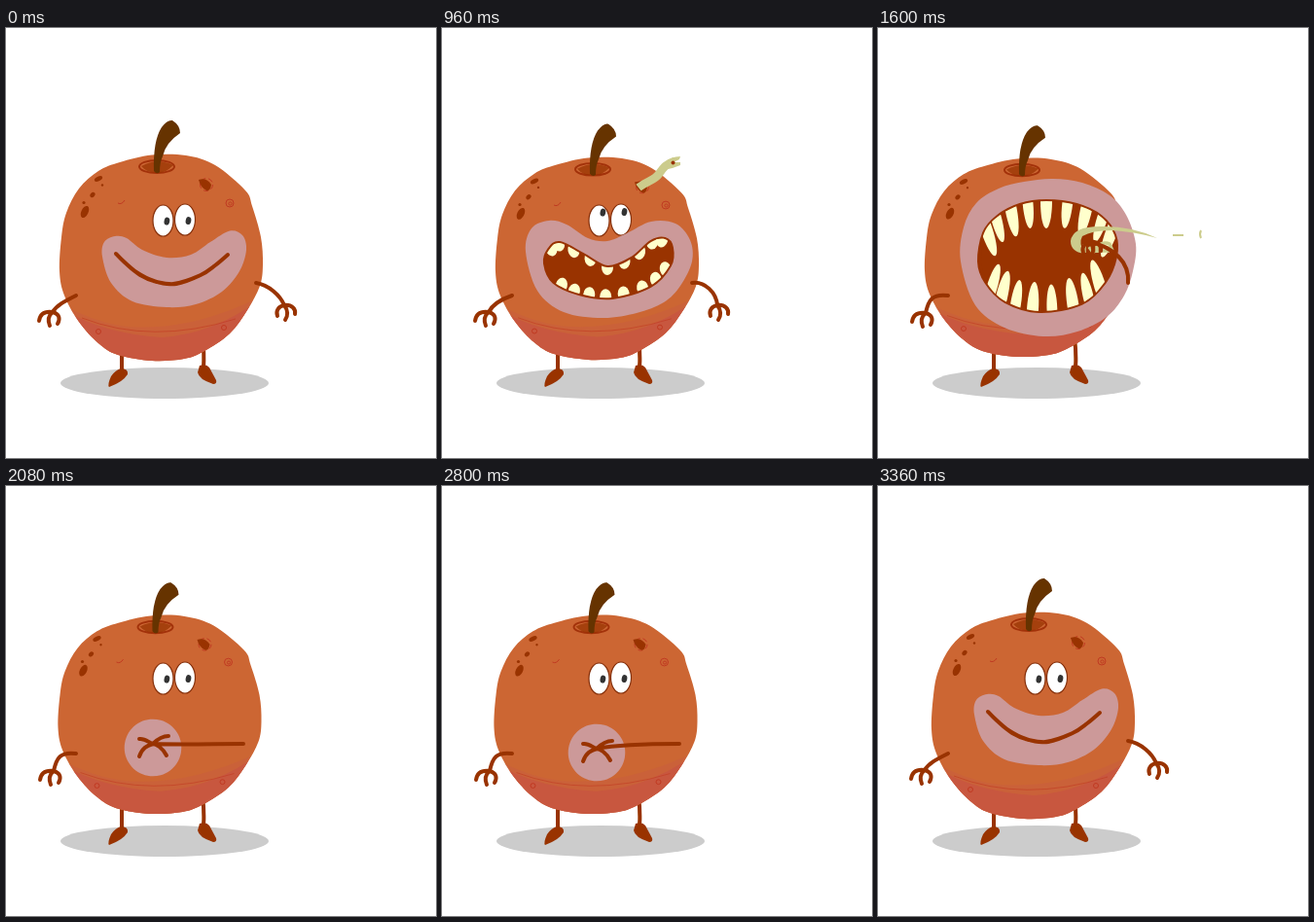
Animation, 442 px wide and 442 px high, one loop 3.4 s. Source, as an HTML page:

```html
<!DOCTYPE html>
<html lang="en">
<head>
<meta charset="utf-8">
<title>Hungry apple</title>
<style>
html, body { margin: 0; width: 100%; height: 100%; overflow: hidden; background: #fff; }
svg { display: block; width: 100vw; height: 100vh; }
.line { fill: none; stroke: #930; stroke-width: 4; stroke-linecap: round; stroke-linejoin: round; }
.thin { fill: none; stroke: #c03a22; stroke-width: 1; }
.dark { fill: #930; }
.worm { fill: none; stroke: #cccc8c; stroke-linecap: butt; }
.eye { fill: #fff; stroke: #84300c; stroke-width: 1.2; }
</style>
</head>
<body>
<svg viewBox="0 0 442 442">
  <defs>
    <clipPath id="skinClip"><path id="skinEdge"/></clipPath>
    <clipPath id="mouthClip"><path id="mouthEdge"/></clipPath>
    <clipPath id="eyeClip">
      <ellipse cx="161.5" cy="198" rx="11.5" ry="17"/>
      <ellipse cx="184" cy="197" rx="11.5" ry="17"/>
    </clipPath>
  </defs>

  <ellipse cx="163" cy="365" rx="107" ry="16" fill="#ccc"/>
  <path class="line" d="M119 322V352M202 318Q204 335 203 350"/>
  <path class="dark" d="M118 350Q126 350 125 356Q120 364 106 369Q104 367 108 358Q112 352 118 350Z"/>
  <path class="dark" d="M199 347Q206 345 209 349L216 362Q217 366 213 366Q198 361 197 354Z"/>

  <g id="body">
    <path id="skin" fill="#c63"/>
    <g clip-path="url(#skinClip)">
      <path fill="#c85c40" d="M50 280Q90 303 125 307Q190 312 262 276V350H50Z" opacity=".45"/>
      <path fill="#c8573f" d="M60 290Q100 314 160 318Q215 314 262 278V350H60Z"/>
      <path class="thin" d="M78 298Q150 326 236 299" opacity=".6"/>
    </g>
    <circle class="thin" cx="95" cy="312" r="2.5"/>
    <circle class="thin" cx="224" cy="308" r="2.5"/>
    <ellipse class="dark" cx="95" cy="155" rx="4.5" ry="2.3" transform="rotate(-28 95 155)"/>
    <circle class="dark" cx="99" cy="161.500" r="1.2"/>
    <ellipse class="dark" cx="89" cy="171.500" rx="2.2" ry="3" transform="rotate(40 89 171.5)"/>
    <circle class="dark" cx="80" cy="179.500" r="1.6"/>
    <ellipse class="dark" cx="81" cy="189" rx="3.6" ry="6.5" transform="rotate(25 81 189)"/>
    <path class="thin" d="M115 180Q119 182 122 177"/>
    <circle class="thin" cx="230" cy="180" r="4"/>
    <circle class="thin" cx="230.500" cy="180.500" r="1.6"/>
    <circle class="thin" cx="206" cy="161" r="6.5" stroke-dasharray="5 3"/>
    <path class="dark" d="M198 156Q206 153 211 161Q210 168 206 167Q200 164 198 156Z"/>
    <ellipse class="thin" cx="155" cy="142.500" rx="18" ry="6.500" style="stroke:#a3320a;stroke-width:2"/>
    <path class="dark" d="M139 142Q155 133 172 141Q163 150 155 149Q145 149 139 142Z" opacity=".75"/>
    <path fill="#630" d="M152 147Q151 116 160 102Q166 94 171 95Q179 100 179 108Q164 118 161 132Q158 138 158 148Q155 151 152 147Z"/>
  </g>

  <g id="worm">
    <path id="wormBody" class="worm" stroke-width="8.500" pathLength="1" stroke-dasharray="1 2" d="M202 164C211 157 218 157 223 150S231 139 239 137"/>
    <g id="wormHead">
      <path fill="#cccc8c" d="M230 138Q235 132 245 132L244 135L238 138L245 138V141Q238 144 232 145Z"/>
      <circle class="dark" cx="237.500" cy="138.500" r="2"/>
    </g>
  </g>

  <ellipse class="eye" cx="161.500" cy="198" rx="10.500" ry="16"/>
  <ellipse class="eye" cx="184" cy="197" rx="10.500" ry="16"/>
  <g clip-path="url(#eyeClip)">
    <g id="pupils" fill="#333">
      <ellipse cx="165.500" cy="198.500" rx="2.800" ry="4" transform="rotate(12 165 198)"/>
      <ellipse cx="187.500" cy="198" rx="2.800" ry="4" transform="rotate(12 187 198)"/>
    </g>
    <path id="lid" fill="#c63" stroke="#84300c" stroke-width="2" d="M130 140H215V197L173 201L130 205Z"/>
  </g>

  <g id="mouth">
    <path id="lips" fill="#c99"/>
    <path id="gap" fill="#930" stroke="#930" stroke-width="4" stroke-linejoin="round"/>
    <g id="teeth" fill="#ffc" clip-path="url(#mouthClip)"></g>
  </g>

  <g id="slurp">
    <path fill="#cccc8c" d="M287 216Q262 204 232 204Q200 203 198 219Q198 230 212 232Q206 221 210 214Q220 208 240 208Q262 209 287 216Z"/>
    <path class="worm" stroke-width="3.500" d="M212 222V231M217 225L222 232M225 231V225Q232 219 238 222L241 229M228 229H238"/>
    <path id="streak" class="worm" stroke-width="2" d="M303 213H314M332 208Q330 212 332 216"/>
  </g>
  <path id="leftArm" class="line"/>
  <path id="rightArm" class="line"/>
</svg>

<script>
const LOOP = 3400;
const el = id => document.getElementById(id);
const set = (id, name, value) => el(id).setAttribute(name, value);
const mix = (a, b, p) => Array.isArray(a) ? a.map((v, i) => mix(v, b[i], p)) : a + (b - a) * p;

// Value of a track of [time, value] rows, eased between rows.
function at(track, t) {
  const i = track.findIndex(row => row[0] > t);
  if (i < 0) return track[track.length - 1][1];
  const [t0, a] = track[i - 1], [t1, b] = track[i];
  const p = (t - t0) / (t1 - t0);
  return mix(a, b, p * p * (3 - 2 * p));
}

// Closed smooth curve through a flat list of x, y values.
function smooth(flat) {
  const n = flat.length / 2;
  const pt = i => { const k = (i + n) % n; return [flat[2 * k], flat[2 * k + 1]]; };
  let d = "M" + pt(0);
  for (let i = 0; i < n; i++) {
    const [a, b, c, e] = [pt(i - 1), pt(i), pt(i + 1), pt(i + 2)];
    const c1 = b.map((v, k) => v + (c[k] - a[k]) / 6);
    const c2 = c.map((v, k) => v - (e[k] - b[k]) / 6);
    d += `C${c1} ${c2} ${c}`;
  }
  return d + "Z";
}

const skin = smooth([95,147, 117,138, 150,130.5, 185,131, 215,141, 246,167, 253,183, 262,215,
  264,243, 261,265, 248,290, 230,314, 204,332, 183,340, 150,342, 115,336, 95,324, 75,302,
  60,275, 55,250, 57,215, 62,190, 75,165]);
set("skin", "d", skin);
set("skinEdge", "d", skin);

// Mouth poses: lips, gap, tooth size [rx, ry, scale of every second tooth].
const smile = [
  [99,235, 101,220, 112,214, 124,216, 140,228, 165,236, 190,233, 210,220, 230,208.5, 243,213,
    247,228, 240,250, 222,271, 195,284, 165,287, 130,281, 108,262],
  [113,232, 122,241, 138,254, 155,261, 175,263, 200,254, 215,244, 228,233, 215,244, 200,254,
    172,263, 152,260, 134,251, 120,239],
  [0, 0, 0]];
const talk = [
  [97,250, 103,229, 118,216, 135,215, 155,226, 170,229, 190,219, 215,209, 235,210, 247,225,
    249,243, 243,265, 225,283, 195,294, 165,298, 130,294, 108,280],
  [128,255, 131,245, 141,241, 155,247, 175,249, 195,240, 208,232, 216,239, 217,255, 215,264,
    195,273, 165,275, 141,271, 131,265],
  [7, 7, 0]];
const grin = [
  [86,230, 92,206, 110,198, 128,202, 150,216, 170,219, 190,211, 215,199, 240,201, 255,218,
    257,240, 245,265, 228,282, 200,293, 165,298, 125,292, 98,270],
  [106,242, 110,228, 121,221, 145,233, 170,246, 195,237, 215,220, 229,217, 236,226, 234,244,
    214,265, 175,277, 141,273, 115,261],
  [6, 8, 1]];
const wide = [
  [85,240, 88,205, 101,180, 124,165, 150,158, 180,155, 210,159, 238,172, 255,192, 265,222,
    262,250, 253,275, 235,297, 205,312, 170,317, 130,308, 100,285],
  [104,240, 109,211, 123,194, 146,182, 173,178, 204,182, 229,194, 243,213, 244,235, 233,261,
    209,283, 166,291, 131,281, 111,261],
  [6, 28, 0.9]];
const ring = (n, x, y, r) => Array.from({ length: n * 2 }, (_, i) => {
  const a = Math.PI + Math.floor(i / 2) * 2 * Math.PI / n;
  return i % 2 ? y + r * Math.sin(a) : x + r * Math.cos(a);
});
const pucker = [ring(17, 151, 269, 29.3), ring(14, 151, 265, 0.2), [0, 0, 0]];

const mouthTrack = [[0, smile], [160, talk], [280, mix(smile, talk, 0.6)], [400, talk], [520, talk],
  [680, grin], [1040, grin], [1360, wide], [1680, wide], [2000, pucker], [3160, pucker], [3360, smile]];

// Body pose: shift x, shift y, scale y.
const tall = [0, 0, 1], rest = [0, 5.45, 0.981], lean = [-7, 8.9, 0.962], tucked = [-1.5, 7.9, 0.962];
const bodyTrack = [[0, tall], [200, rest], [560, rest], [620, tall], [680, rest], [960, rest],
  [1080, tall], [1360, lean], [1720, lean], [2040, tucked], [2800, tucked], [3040, tall]];

// Arms: shoulder, two controls, hand.
const loose = [72,275, 60,281, 52,285, 48,292];
const hung = [72,275, 57,273, 52,282, 48,292];
const bent = [72,275, 56,273, 52,279, 49,293];
const leftTrack = [[0, loose], [200, hung], [560, hung], [620, loose], [680, hung], [1080, loose],
  [1360, bent], [2800, bent], [3040, loose]];

const down = [257,262, 270,264, 282,275, 286,285];
const relaxed = [257,262, 270,260, 282,272, 283,285];
const grab = [257,262, 300,250, 290,170, 246,142];
const rub = [244,265, 215,265, 180,266, 151,265];
const rightTrack = [[0, down], [200, relaxed], [960, relaxed], [1080, grab], [1120, grab],
  [1280, [257,262, 290,250, 320,180, 345,150]], [1440, [257,262, 300,270, 350,240, 382,218]],
  [1600, [257,262, 259,241, 242,225, 218,220]], [1720, [257,262, 259,241, 242,225, 218,220]],
  [1960, rub], [3160, rub], [3360, down]];

const leftFingers = [[-8,-1, -13,2, -14,9], [-5,4, -5,9, -3,14], [7,2, 8,7, 5,12]];
const open = [[-6,1, -9,6, -7,11], [4,5, 4,11, 1,15], [8,-1, 12,4, 11,9], [0,0, 0,0, 0,0]];
const spread = [[-4,-1, -8,-6, -14,-5], [-6,2, -11,4, -14,13], [3,0, 10,4, 14,12], [4,-4, 10,-8, 16,-8]];
const fingerTrack = [[0, open], [1680, open], [1960, spread], [3160, spread], [3360, open]];

const lidTrack = [[0, 0], [160, 1], [540, 1], [640, 0]];
const gazeTrack = [[0, 0], [160, 4], [520, 4], [640, -9], [1440, -9], [1680, 0]];
const wormTrack = [[0, 0], [240, 1]];
const spinTrack = [[0, 0], [1120, 0], [1440, 150]];
const swayTrack = [[0, 12], [2600, 12], [2800, 5]];
const rubTrack = [[0, 0], [2040, 0], [2080, 1], [3160, 1], [3280, 0]];

const teeth = [];
function addTeeth(count, start, step, side) {
  for (let i = 0; i < count; i++) {
    const node = document.createElementNS("http://www.w3.org/2000/svg", "ellipse");
    el("teeth").append(node);
    teeth.push({ node, u: start + step * i, side, odd: i % 2 });
  }
}
addTeeth(9, 1.2, 0.7, 1);
addTeeth(8, 9.2, 0.5, -1);

function drawMouth(t, dx, dy) {
  const [lips, gap, [rx, ry, second]] = at(mouthTrack, t);
  const edge = smooth(gap);
  set("lips", "d", smooth(lips));
  set("gap", "d", edge);
  set("mouthEdge", "d", edge);
  set("mouth", "transform", `translate(${dx} ${dy})`);
  for (const { node, u, side, odd } of teeth) {
    const k = Math.floor(u) * 2, f = u % 1;
    const x = mix(gap[k], gap[k + 2], f), y = mix(gap[k + 1], gap[k + 3], f);
    const s = odd ? second : 1;
    node.setAttribute("rx", rx * s);
    node.setAttribute("ry", ry * s);
    node.setAttribute("transform", `translate(${x} ${y}) rotate(${side * (x - 172) * 0.3})`);
  }
}

function armPath(a, fingers) {
  const [x, y] = a.slice(6);
  const tips = fingers.map(f => `M${x} ${y}c${f}`).join("");
  return `M${a.slice(0, 2)}C${a.slice(2)}${tips}`;
}

function draw(t) {
  const [bx, by, sy] = at(bodyTrack, t);
  set("body", "transform", `matrix(1 0 0 ${sy} ${bx} ${by})`);

  const turn = (t - 2080) / 576 * 2 * Math.PI, amount = at(rubTrack, t);
  const dx = (8 - 8 * Math.cos(turn)) * amount;
  const dy = at(swayTrack, t) * Math.sin(turn) * amount;
  drawMouth(t, dx, dy);

  const arm = at(rightTrack, t);
  arm[6] += dx;
  arm[7] += dy;
  set("rightArm", "d", armPath(arm, at(fingerTrack, t)));
  set("leftArm", "d", armPath(at(leftTrack, t), leftFingers));

  const out = at(wormTrack, t), held = t >= 1120;
  set("worm", "visibility", t > 0 && t < 1600 ? "visible" : "hidden");
  set("wormBody", "stroke-dashoffset", 1 - out);
  set("wormHead", "transform", `translate(${(out - 1) * 36} ${(1 - out) * 27})`);
  set("worm", "transform", held
    ? `translate(${arm[6] - 246} ${arm[7] - 142}) rotate(${at(spinTrack, t)} 240 138)` : "");
  set("slurp", "visibility", t >= 1600 && t < 1760 ? "visible" : "hidden");
  set("streak", "opacity", t < 1680 ? 1 : 0);

  set("lid", "transform", `translate(0 ${(at(lidTrack, t) - 1) * 40})`);
  set("pupils", "transform", `translate(0 ${at(gazeTrack, t)})`);
}

function frame(now) {
  const t = now % LOOP;
  const step = t >= 960 && t < 1760 ? 80 : 40;
  draw(Math.floor(t / step) * step);
  requestAnimationFrame(frame);
}
draw(0);
requestAnimationFrame(frame);
</script>
</body>
</html>
```
